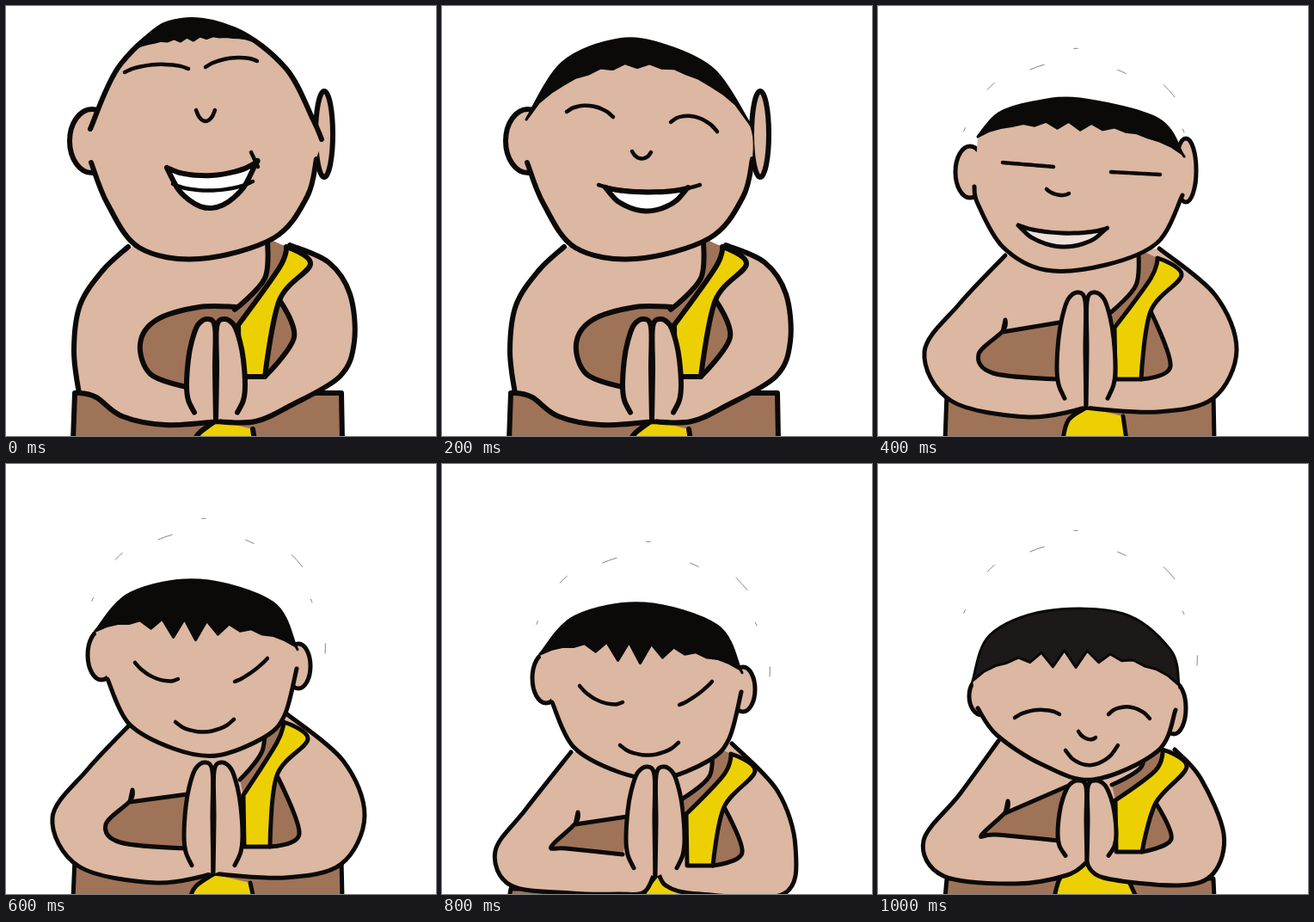
Recreate the animation shown at these times as an HTML page with a canvas. Size 500 by 500 pixels, loop 1200 ms.

```html
<!DOCTYPE html>
<html lang="en">
<head>
<meta charset="utf-8">
<title>Bowing monk</title>
<style>
html, body { margin: 0; height: 100%; overflow: hidden; background: #fff; }
canvas { display: block; width: 100vw; height: 100vh; }
</style>
</head>
<body>
<canvas width="500" height="500"></canvas>
<script>
const ctx = document.querySelector('canvas').getContext('2d');
const STEP = 200;
const INK = '#0b0a09', SKIN = '#dcb7a2', BROWN = '#9f7358', YELLOW = '#edd004';
let line = 5;

// "x,y x,y!" to points; "!" marks a corner
const pts = text => text.split(' ').map(w => [...w.replace('!', '').split(',').map(Number), w.endsWith('!')]);

// Smooth open curve through points, filled and/or stroked
function curve(points, fill, width = line) {
  const p = typeof points === 'string' ? pts(points) : points;
  const at = i => p[Math.max(0, Math.min(p.length - 1, i))];
  const slope = (i, k) => at(i)[2] ? 0 : (at(i + 1)[k] - at(i - 1)[k]) / 6;
  ctx.beginPath();
  ctx.moveTo(p[0][0], p[0][1]);
  for (let i = 0; i < p.length - 1; i++) {
    const [ax, ay] = p[i], [bx, by] = p[i + 1];
    ctx.bezierCurveTo(ax + slope(i, 0), ay + slope(i, 1), bx - slope(i + 1, 0), by - slope(i + 1, 1), bx, by);
  }
  paint(fill, width);
}

function paint(fill, width) {
  if (fill) {
    ctx.fillStyle = fill;
    ctx.fill();
  }
  if (width) {
    ctx.lineWidth = width;
    ctx.stroke();
  }
}

// Bowed line between two points, sagging down in the middle
function arc(x1, y1, x2, y2, sag, n = 8) {
  return Array.from({ length: n + 1 }, (_, i) => {
    const t = i / n;
    return [x1 + (x2 - x1) * t, y1 + (y2 - y1) * t + sag * Math.abs(Math.sin(Math.PI * t)) ** 0.7];
  });
}

const stroke = (...a) => curve(arc(...a), null, 4.5);

function grin(x1, y1, x2, y2, lip, chin, fill) {
  curve([...arc(x1, y1, x2, y2, lip), ...arc(x2, y2, x1, y1, chin)], fill);
}

function ear(x, y, rx, ry) {
  ctx.beginPath();
  ctx.ellipse(x, y, rx, ry, 0, 0, 7);
  paint(SKIN, line);
}

// Cap of hair under the crown line, with a ragged fringe
function hair(crown, arch, tooth, color = INK) {
  const top = pts(crown), [x1, y1] = top[0], [x2, y2] = top[top.length - 1];
  const n = 18;
  const fringe = arc(x2, y2, x1, y1, -arch, n).map(([x, y], i) =>
    [x, y + (i % 2) * tooth * (0.4 + 0.6 * Math.abs(Math.sin(i * 5))) * Math.sin(Math.PI * i / n) ** 3, true]);
  curve([...top, ...fringe], color, 3);
}

function head({ ears, crown, jaw, cap, arch, tooth, color, face }) {
  ears.forEach(e => ear(...e));
  curve([...pts(crown), ...pts(jaw)], SKIN, 0);
  curve(jaw);
  if (cap) curve(crown);
  hair(cap || crown, arch, tooth, color);
  face();
}

// sash: shoulder point and lower left corner; elbow: height of the arm bend above the hem
function body({ torso, drop = 0, shawl, sash: [sx, sy, bx, by], elbow = 15, hands: [cx, , hip], flare }) {
  const waist = 450 + drop;
  curve(`78,505 80,${waist}! 390,${waist}! 391,505`, BROWN);
  curve(`${cx},${hip} ${cx - flare * 0.75},${hip + 14} ${cx - flare},505! ${cx + flare + 20},505! ${cx + 43},${hip + 10}`, YELLOW);

  ctx.save();
  ctx.translate(0, drop);
  curve(torso, SKIN);
  ctx.restore();

  curve(shawl, BROWN);
  const edge = [[sx - 22, sy - 10], [sx - 25, (sy + by - 78) / 2], [bx - 5, by - 78, true]];
  const inner = [[bx - 1, by - 60, true], [sx - 8, sy + 24], [sx, sy, true]];
  const outer = [[sx + 28, sy + 20], [sx - 8, sy + 62], [bx + 30, by, true]];
  curve([...edge, ...inner], BROWN, 0);
  curve(edge);
  curve([[sx - 8, sy + 62, true], [bx + 64, by - elbow], [bx + 30, by, true]], BROWN);
  curve([...inner, ...outer, [bx, by, true], inner[0]], YELLOW);
}

// Left side shawl: notch at the armpit, end at the hand, hem above the forearm
const drape = (x, y, ex, ey, hem) =>
  `${ex},${ey}! ${x - 3},${y + 14}! ${x},${y}! ${x - 3},${y + 13} ${x - 31},${y + 40} ${x - 14},${hem - 7} 210,${hem}!`;

function hands([cx, top, bottom]) {
  const h = bottom - top;
  for (const side of [-1, 1]) {
    const spot = (dx, t) => [cx + side * dx, top + h * t];
    curve([spot(0, 1), spot(1, 0.5), spot(1, 0.08), spot(10, 0), spot(21, 0.06), spot(28, 0.22),
      spot(32, 0.4), spot(34, 0.65), spot(32, 0.8), spot(25, 0.92)], SKIN);
  }
}

// Faint marks in a ring around the head
function dust(x, y) {
  for (let i = 0; i < 8; i++) {
    const a = Math.PI * (1.12 + i * 0.125), r = 140 + 8 * Math.sin(i * 9);
    ctx.beginPath();
    ctx.arc(x, y, r, a, a + 0.03 + 0.05 * (i % 3));
    paint(null, 0.5);
  }
}

const tall = {
  line: 6,
  torso: '142,280 112,308 86,348 79,400 85,450! 105,455 135,477 185,487 246,483! 290,483 330,465 388,431 405,390 400,335 375,298 330,278',
  shawl: '268,350 225,350 175,365 156,393 168,428 210,443! 270,372!',
  sash: [326, 280, 271, 431], elbow: 46, hands: [244, 364, 482], flare: 25,
  ears: [[100, 157, 26, 37], [370, 149, 10, 50]],
  jaw: '361,178 350,222 311,270 225,294 155,281 118,230 99,182'
};

const bow = {
  torso: '148,290 95,346 54,402 85,459 175,478 241,467! 325,472 390,456 417,400 392,336 327,282',
  flare: 27
};

const nodding = {
  ears: [[111, 222, 16, 29], [340, 235, 14, 26]],
  crown: '104,194 145,150 225,135 310,161 337,212',
  jaw: '338,238 324,292 300,318 245,339 195,331 143,302 118,250',
  arch: 22, tooth: 26,
  face() {
    stroke(150, 231, 200, 250, 9);
    stroke(266, 253, 304, 226, 3);
    stroke(197, 300, 265, 297, 13);
  }
};

const poses = [
  {
    ...tall,
    crown: '98,143 133,68 195,19 265,27 325,72 357,132 367,155',
    cap: '150,49 172,28 195,17 235,17 286,40', arch: 9, tooth: 5,
    face() {
      stroke(138, 77, 212, 73, -7);
      stroke(232, 71, 292, 64, -7);
      stroke(221, 121, 243, 121, 13);
      grin(187, 188, 291, 182, 12, 50, '#fff');
      stroke(194, 207, 287, 204, 9);
      stroke(285, 170, 293, 187, 0);
    }
  },
  {
    ...tall,
    crown: '98,132 140,66 205,39 260,46 317,75 356,134',
    arch: 67, tooth: 6,
    face() {
      stroke(145, 123, 199, 129, -10);
      stroke(266, 135, 320, 146, -12);
      stroke(221, 169, 243, 170, 8);
      grin(190, 211, 285, 212, 5, 27, '#fff');
      stroke(182, 208, 300, 208, 8);
    }
  },
  {
    ...bow, shawl: drape(148, 365, 211, 368, 434),
    sash: [325, 293, 276, 434], hands: [242, 333, 467],
    ears: [[107, 193, 17, 30], [358, 191, 12, 37]],
    crown: '116,152 140,125 180,112 235,108 325,131 354,172',
    jaw: '354,220 325,275 265,301 195,307 145,280 116,230 112,210',
    arch: 27, tooth: 10, ring: [230, 197],
    face() {
      stroke(145, 182, 204, 187, 0);
      stroke(271, 193, 328, 196, 0);
      stroke(196, 213, 222, 218, 4);
      grin(163, 255, 265, 259, 7, 23, '#efe0d9');
    }
  },
  {
    ...bow, ...nodding, drop: 9, shawl: drape(147, 379, 211, 384, 447),
    sash: [323, 300, 277, 445], hands: [241, 347, 477], ring: [230, 211]
  },
  {
    ...nodding, nod: [10, 27], drop: 44, shawl: drape(158, 405, 222, 409, 454),
    torso: '150,291 97,358 62,406 80,446 150,455 205,456 236,453 250,421! 260,446 300,456 397,456 411,401 390,336 337,281',
    sash: [336, 337, 285, 467], hands: [248, 352, 480], flare: 14, ring: [240, 238]
  },
  {
    drop: 32, shawl: drape(151, 392, 224, 373, 438),
    torso: '140,290 95,352 53,406 76,447 160,456 220,446 243,430! 262,449 350,458 390,444 402,398 375,333 345,300',
    sash: [331, 332, 277, 451], hands: [243, 368, 463], flare: 38,
    ears: [[121, 270, 15, 22], [344, 284, 14, 30]],
    crown: '110,252 130,199 195,171 285,174 340,216 350,257',
    jaw: '346,286 325,334 250,367 190,349 138,315 116,284',
    arch: 38, tooth: 22, color: '#1c1918', ring: [230, 225],
    face() {
      stroke(159, 295, 211, 291, -7);
      stroke(268, 291, 316, 296, -11);
      stroke(233, 311, 253, 318, 5);
      stroke(218, 333, 279, 327, 20);
    }
  }
];

ctx.lineCap = ctx.lineJoin = 'round';

function frame(now) {
  const pose = poses[Math.floor(now / STEP) % poses.length];
  line = pose.line || 5;
  ctx.fillStyle = '#fff';
  ctx.fillRect(0, 0, 500, 500);
  ctx.strokeStyle = INK;
  if (pose.ring) dust(...pose.ring);
  body(pose);
  ctx.save();
  if (pose.nod) ctx.translate(...pose.nod);
  head(pose);
  ctx.restore();
  hands(pose.hands);
  requestAnimationFrame(frame);
}
requestAnimationFrame(frame);
</script>
</body>
</html>
```
